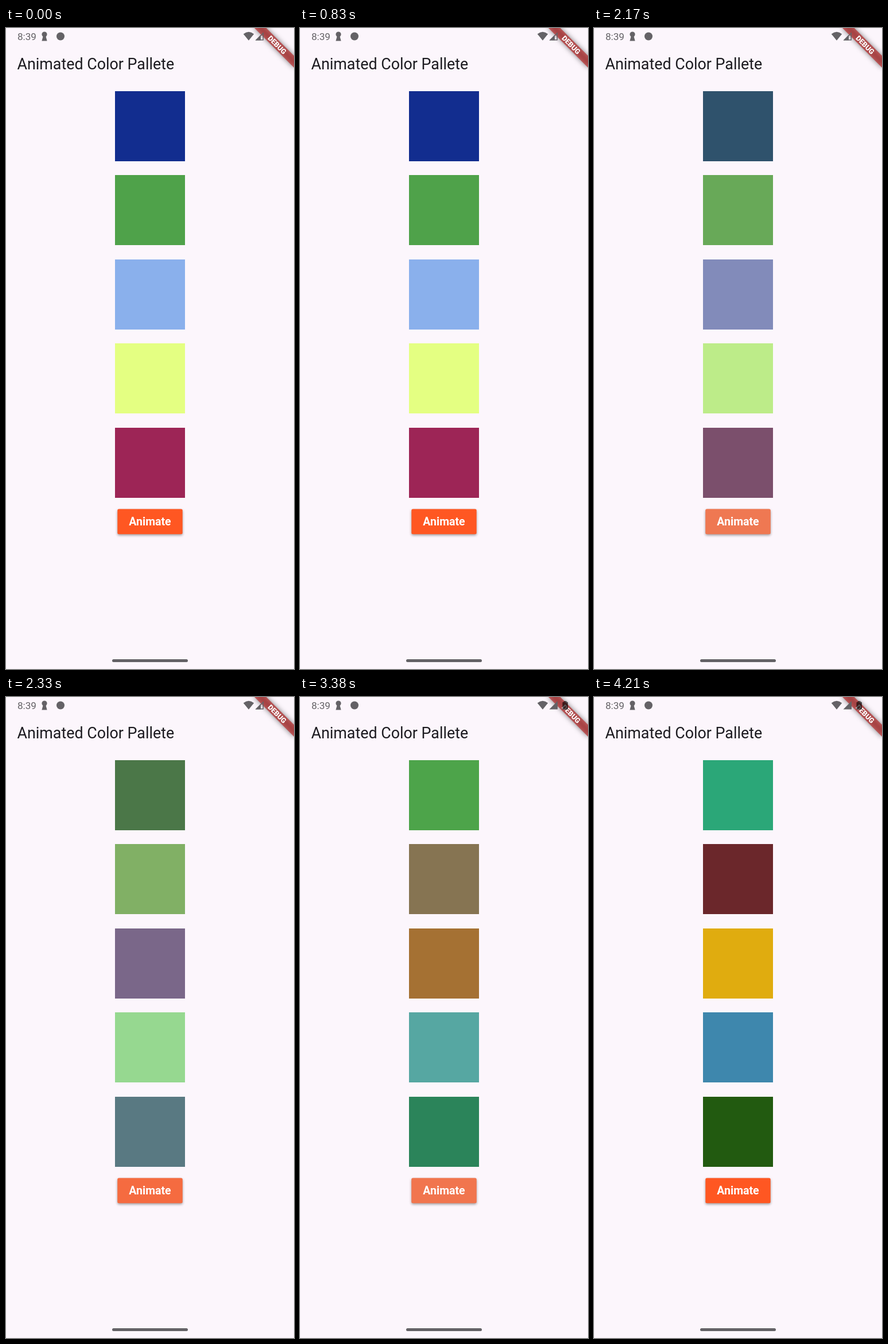
These frames come from a looping animation (502x1116 px, 4250 ms). An HTML page with a canvas:

```html
<!DOCTYPE html>
<html lang="en">
<head>
<meta charset="utf-8">
<title>Animated Color Pallete</title>
<style>
  html, body { margin: 0; width: 100%; height: 100%; overflow: hidden; background: #fcf6fc; }
  canvas { display: block; width: 502px; height: 1116px; }
</style>
</head>
<body>
<canvas id="stage" width="502" height="1116"></canvas>
<script>
const ctx = document.getElementById('stage').getContext('2d');
const LOOP = 4250, FADE = 500;
const TAPS = [2010, 3148];
const STATUS_CHANGE = 2520;
const UNIT = 502 / 411.4; // logical pixel
const INK = '#646266';

const PALETTES = [
  ['#122d8f', '#4fa24a', '#8ab0ec', '#e4ff82', '#9d2556'],
  ['#6ba121', '#9db874', '#713e52', '#6bc398', '#33a89b'],
  ['#2ba778', '#6b272b', '#e0ac0f', '#3e87ad', '#225a10']
].map(row => row.map(hex => [1, 3, 5].map(i => parseInt(hex.substr(i, 2), 16))));

// Press overlay: [ms after tap, opacity]
const SPLASH = [[-100, 0], [0, 0.32], [160, 0.29], [235, 0.26], [515, 0]];

const clamp01 = v => Math.min(1, Math.max(0, v));
const mix = (a, b, p) => a.map((v, i) => v + (b[i] - v) * p);
const rgb = c => `rgb(${c.map(Math.round).join(',')})`;

function splashAlpha(dt) {
  for (let i = 1; i < SPLASH.length; i++) {
    const [t0, a0] = SPLASH[i - 1], [t1, a1] = SPLASH[i];
    if (dt >= t0 && dt < t1) return a0 + (a1 - a0) * (dt - t0) / (t1 - t0);
  }
  return 0;
}

function text(str, x, y, size, weight, color, align = 'left') {
  ctx.font = `${weight} ${size}px Roboto, sans-serif`;
  ctx.textAlign = align;
  ctx.fillStyle = color;
  ctx.fillText(str, x, y);
}

function shape(points, color) {
  ctx.beginPath();
  points.forEach(([x, y]) => ctx.lineTo(x, y));
  ctx.closePath();
  ctx.fillStyle = color;
  ctx.fill();
}

function disc(x, y, r, color) {
  ctx.beginPath();
  ctx.arc(x, y, r, 0, Math.PI * 2);
  ctx.fillStyle = color;
  ctx.fill();
}

function pill(x, y, w, h, r, color) {
  ctx.beginPath();
  ctx.roundRect(x, y, w, h, r);
  ctx.fillStyle = color;
  ctx.fill();
}

function drawBanner() {
  const s = UNIT;
  ctx.save();
  ctx.translate(502, 0);
  ctx.rotate(Math.PI / 4);
  ctx.filter = 'blur(4.8px)';
  ctx.fillStyle = 'rgba(0,0,0,0.5)';
  ctx.fillRect(-40 * s, 28 * s, 80 * s, 12 * s);
  ctx.filter = 'none';
  ctx.fillStyle = 'rgba(183,28,28,0.627)';
  ctx.fillRect(-40 * s, 28 * s, 80 * s, 12 * s);
  text('DEBUG', 0, 34 * s + 4.4, 10.2 * s, 900, '#fff', 'center');
  ctx.restore();
}

function drawStatus(charged) {
  text('8:39', 20, 20.5, 17.1, 400, INK);

  // keyhole
  disc(67, 11, 4.6, INK);
  shape([[65, 13], [69, 13], [71.6, 22.5], [62.4, 22.5]], INK);

  disc(95, 14.5, 7, INK);

  // wifi fan
  ctx.beginPath();
  ctx.moveTo(423, 21.8);
  ctx.lineTo(413.8, 10.4);
  ctx.quadraticCurveTo(423, 3.2, 432.2, 10.4);
  ctx.closePath();
  ctx.fillStyle = INK;
  ctx.fill();

  // signal
  if (charged) {
    shape([[434.5, 21.5], [449, 21.5], [449, 7]], INK);
    pill(457.5, 8.5, 9.5, 13.5, 1.5, 'rgba(0,0,0,0.65)');
    ctx.fillRect(460, 7, 4.5, 1.5);
  } else {
    shape([[434.5, 21.5], [444, 21.5], [444, 12]], INK);
    ctx.beginPath();
    ctx.moveTo(436.5, 20.8);
    ctx.lineTo(448.3, 20.8);
    ctx.lineTo(448.3, 9);
    ctx.closePath();
    ctx.strokeStyle = INK;
    ctx.lineWidth = 1.4;
    ctx.stroke();
  }
}

function drawButton(alpha) {
  const box = [194.3, 837.6, 113.4, 43.6, 2.5];
  ctx.save();
  ctx.shadowColor = 'rgba(0,0,0,0.38)';
  ctx.shadowBlur = 4.5;
  ctx.shadowOffsetY = 2;
  pill(...box, '#ff5722');
  ctx.restore();
  if (alpha > 0) pill(...box, `rgba(200,200,200,${alpha})`);
  text('Animate', 251, 866, 16 * UNIT, 700, '#fff', 'center');
}

function draw(t) {
  ctx.fillStyle = '#fcf6fc';
  ctx.fillRect(0, 0, 502, 1116);

  text('Animated Color Pallete', 19.5, 72, 22 * UNIT, 400, '#1c1b20');

  const [p, q] = TAPS.map(tap => clamp01((t - tap) / FADE));
  for (let i = 0; i < 5; i++) {
    const color = mix(mix(PALETTES[0][i], PALETTES[1][i], p), PALETTES[2][i], q);
    ctx.fillStyle = rgb(color);
    ctx.fillRect(190, Math.round(109.8 + i * 146.48), 122, 122);
  }

  drawButton(Math.max(...TAPS.map(tap => splashAlpha(t - tap))));
  drawBanner();
  drawStatus(t >= STATUS_CHANGE);
  pill(185, 1099, 132, 5, 2.5, INK);
}

function tick() {
  draw(performance.now() % LOOP);
  requestAnimationFrame(tick);
}
tick();
</script>
</body>
</html>
```
